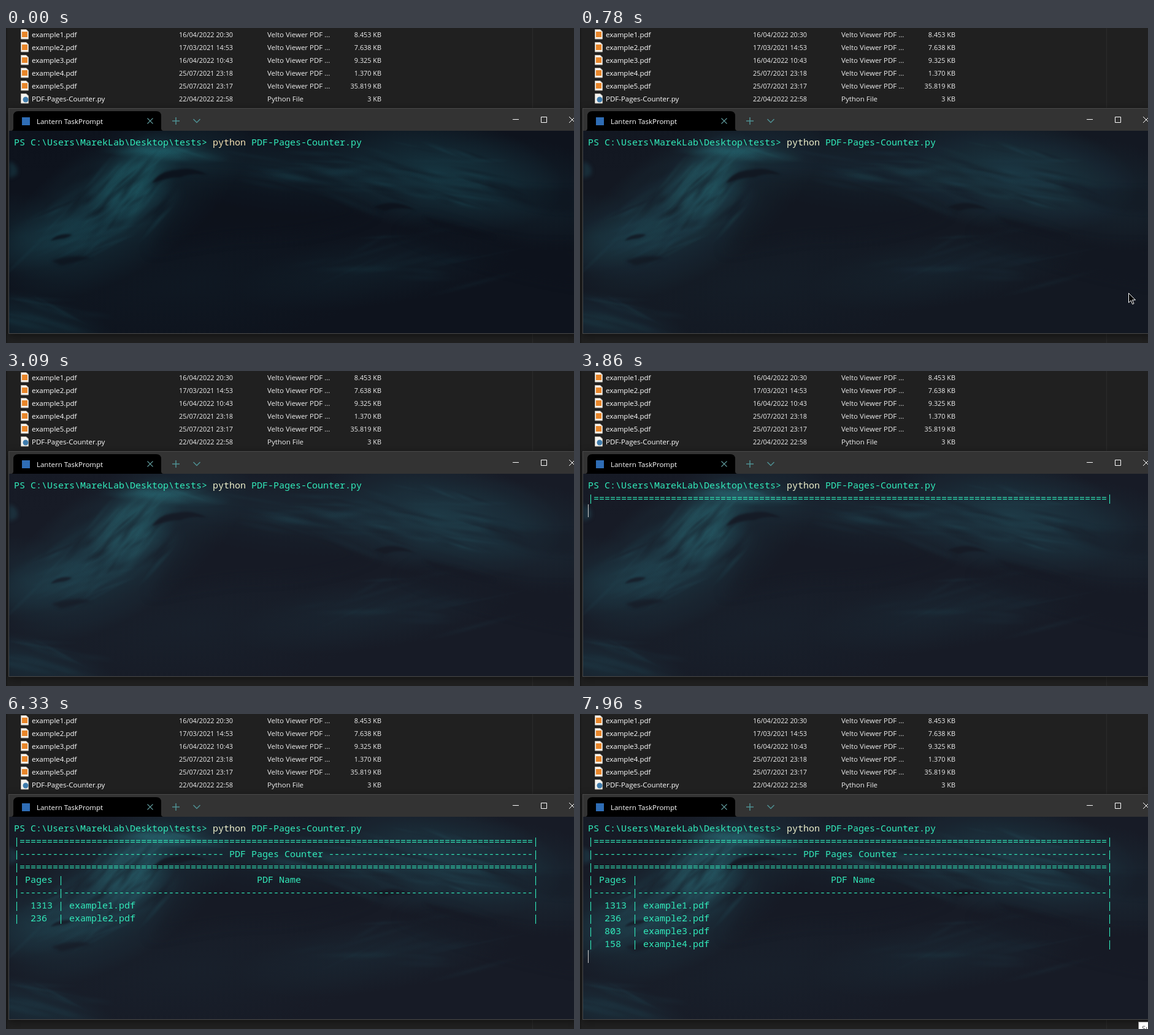
Recreate the animation shown at these times as an HTML page with a canvas. Size 926x515 px, loop 8 s.

```html
<!DOCTYPE html>
<html lang="en">
<head>
<meta charset="utf-8">
<title>PDF Pages Counter</title>
<style>
html, body { margin: 0; width: 100%; height: 100%; overflow: hidden; background: #202020; }
#stage { position: relative; width: 926px; height: 515px; overflow: hidden; background: #202020; font-family: "Open Sans", "Noto Sans", sans-serif; }
#stage > *, #term > * { position: absolute; }
.edge { left: 0; top: 0; width: 2px; height: 515px; background: #191919; }
.pane { left: 858px; top: 0; width: 1px; height: 515px; background: #2b2b2b; }
#files { left: 0; top: 0; }
#files text { fill: #fff; font-size: 11.5px; }
#files .num { font-size: 10.85px; fill: #f0f0f0; }
#files .kind { fill: #f0f0f0; }
#term { left: 4px; top: 131px; width: 930px; height: 369px; background: #333; box-shadow: 0 3px 12px rgba(0,0,0,.45); }
#art { left: 1px; top: 37px; }
#glow { left: 1px; top: 37px; width: 929px; height: 331px; background: rgba(110,110,130,.09); animation: focus 8s step-end infinite; }
#rim { inset: 0; border: 1px solid #4a4a4a; box-sizing: border-box; }
#chrome { left: 0; top: 131px; }
#lines { left: 13px; top: 176px; font: 500 15px/21px "Noto Sans Mono", "DejaVu Sans Mono", monospace; color: #32ebbb; white-space: pre; }
#lines div { height: 21px; }
#lines b { font-weight: 500; color: #eef0cb; animation: cmd 8s step-end infinite; }
#caret { left: 13px; top: 176px; width: 1px; height: 21px; background: #ccc; animation: caret 8s step-end infinite; }
#mouse { left: 0; top: 0; animation: mouse 8s step-end infinite; }
#tip { left: 910px; top: 503px; width: 30px; height: 24px; background: #fff; border: 1px solid #767676; box-sizing: border-box; font-size: 11.4px; line-height: 19px; padding-left: 5px; color: #575757; animation: tip 8s step-end infinite; }
.top { animation: top 8s step-end infinite; }
.head { animation: head 8s step-end infinite; }
.row1 { animation: row1 8s step-end infinite; }
.row2 { animation: row2 8s step-end infinite; }
.row3 { animation: row3 8s step-end infinite; }
.row4 { animation: row4 8s step-end infinite; }
@keyframes cmd { 0% { color: #f7e4b4; } .375%, 100% { color: #eef0cb; } }
@keyframes top { 0% { opacity: 0; } 48.25%, 100% { opacity: 1; } }
@keyframes head { 0% { opacity: 0; } 48.625%, 100% { opacity: 1; } }
@keyframes row1 { 0% { opacity: 0; } 62.125%, 100% { opacity: 1; } }
@keyframes row2 { 0% { opacity: 0; } 69.5%, 100% { opacity: 1; } }
@keyframes row3 { 0% { opacity: 0; } 88.5%, 100% { opacity: 1; } }
@keyframes row4 { 0% { opacity: 0; } 91%, 100% { opacity: 1; } }
@keyframes tip { 0% { opacity: 0; } 99%, 100% { opacity: 1; } }
@keyframes focus {
  0% { opacity: 0; } 8.25% { opacity: .2; } 8.8% { opacity: .4; }
  9.4% { opacity: .6; } 10% { opacity: .8; } 10.5%, 100% { opacity: 1; }
}
@keyframes caret {
  0% { opacity: 0; transform: translate(567px, 0); }
  15% { opacity: 1; transform: translate(567px, 0); }
  17.25% { opacity: 1; transform: translate(0, 21px); }
  25.25% { opacity: 0; transform: translate(0, 21px); }
  32% { opacity: 1; transform: translate(0, 21px); }
  38.625% { opacity: 0; transform: translate(0, 21px); }
  45.375% { opacity: 1; transform: translate(0, 21px); }
  48.25% { opacity: 1; transform: translate(0, 42px); }
  48.625% { opacity: 1; transform: translate(0, 126px); }
  52.125% { opacity: 0; transform: translate(0, 126px); }
  58.875% { opacity: 1; transform: translate(0, 126px); }
  62.125% { opacity: 1; transform: translate(0, 147px); }
  65.625% { opacity: 0; transform: translate(0, 147px); }
  72.375% { opacity: 1; transform: translate(0, 168px); }
  79.125% { opacity: 0; transform: translate(0, 168px); }
  85.875% { opacity: 1; transform: translate(0, 168px); }
  88.5% { opacity: 1; transform: translate(0, 189px); }
  91% { opacity: 1; transform: translate(0, 210px); }
  92.625% { opacity: 0; transform: translate(0, 210px); }
  99.5%, 100% { opacity: 1; transform: translate(0, 210px); }
}
@keyframes mouse {
  0% { transform: translate(890px, 530px); }
  2.625% { transform: translate(890px, 491px); }
  3% { transform: translate(890px, 465px); }
  3.375% { transform: translate(891px, 447px); }
  3.75% { transform: translate(893px, 437px); }
  4.125% { transform: translate(894px, 433px); }
  17.625% { transform: translate(894px, 530px); }
  83.875% { transform: translate(894px, 434px); }
  84.25% { transform: translate(895px, 439px); }
  84.625% { transform: translate(896px, 449px); }
  85% { transform: translate(897px, 463px); }
  85.5% { transform: translate(898px, 479px); }
  85.875% { transform: translate(899px, 494px); }
  86.25% { transform: translate(900px, 507px); }
  86.625%, 100% { transform: translate(900px, 530px); }
}
</style>
</head>
<body>
<div id="stage">
  <div class="edge"></div>
  <div class="pane"></div>
  <svg id="files" width="926" height="131"></svg>
  <div id="term">
    <canvas id="art" width="929" height="331"></canvas>
    <div id="glow"></div>
    <div id="rim"></div>
  </div>
  <svg id="chrome" width="926" height="38" fill="none">
    <path d="M8 37q4 0 4-4V13q0-8 8-8h225q8 0 8 8v20q0 4 4 4z" fill="#000"/>
    <rect x="26" y="15" width="13" height="13" fill="#2f6db5"/>
    <text x="50" y="26" font-size="11.5" fill="#fff">Lantern TaskPrompt</text>
    <path d="M230.500 16.500l9 9m0-9l-9 9" stroke="#5d9698" stroke-width="1.200"/>
    <path d="M271 21h12m-6-6v12M305.500 18l5.500 5.500 5.500-5.500" stroke="#4f9194" stroke-width="1.500"/>
    <path d="M826 18.500h10M872.500 14.500h9v9h-9zM918 14l10 10m0-10l-10 10" stroke="#fff"/>
  </svg>
  <div id="lines"></div>
  <div id="caret"></div>
  <div id="tip">Su</div>
  <svg id="mouse" width="13" height="21"><path d="M.5.5v15.500l3.700-3.500 2.500 6 2.300-1-2.500-5.800h5z" fill="#000" stroke="#fff"/></svg>
</div>
<script>
const $ = id => document.getElementById(id);

// File list
const files = [
  ["example1.pdf", "16/04/2022 20:30", "8.453 KB"],
  ["example2.pdf", "17/03/2021 14:53", "7.638 KB"],
  ["example3.pdf", "16/04/2022 10:43", "9.325 KB"],
  ["example4.pdf", "25/07/2021 23:18", "1.370 KB"],
  ["example5.pdf", "25/07/2021 23:17", "35.819 KB"],
  ["PDF-Pages-Counter.py", "22/04/2022 22:58", "3 KB"]
];
$("files").innerHTML = files.map(([name, date, size], i) => {
  const py = name.endsWith(".py");
  const mark = py ? '<circle cx="32" cy="12" r="4.500" fill="#3f7cac"/>'
                  : '<rect x="26" y="6" width="9" height="9" fill="#e8862a"/>';
  return `<g transform="translate(0 ${i * 21})">
    <path d="M24.500 2.500h8.500l3.500 3.500v12h-12z" fill="#f5f3ee" stroke="#b9b4ab"/>${mark}
    <text x="42" y="15">${name}</text><text class="num" x="282" y="15">${date}</text>
    <text class="kind" x="426" y="15">${py ? "Python File" : "Velto Viewer PDF ..."}</text>
    <text class="num" x="612" y="15" text-anchor="end">${size}</text></g>`;
}).join("");

// Terminal output
const bar = "|" + "=".repeat(93) + "|";
const dash = n => "-".repeat(n);
const row = (pages, name) => `|${("  " + pages).padEnd(7)}| ${name.padEnd(84)}|`;
const lines = [
  ["", "PS C:\\Users\\MarekLab\\Desktop\\tests&gt; <b>python</b> PDF-Pages-Counter.py"],
  ["top", bar],
  ["head", `|${dash(37)} PDF Pages Counter ${dash(37)}|`],
  ["head", bar],
  ["head", `| Pages |${" ".repeat(35)}PDF Name${" ".repeat(42)}|`],
  ["head", `|${dash(7)}|${dash(85)}|`],
  ["row1", row(1313, "example1.pdf")],
  ["row2", row(236, "example2.pdf")],
  ["row3", row(803, "example3.pdf")],
  ["row4", row(158, "example4.pdf")]
];
$("lines").innerHTML = lines.map(([cls, text]) => `<div class="${cls}">${text}</div>`).join("");

// Painted backdrop, in stage coordinates
const ctx = $("art").getContext("2d");
ctx.translate(-5, -168);
let seed = 7;
const rnd = () => (seed = (seed * 16807) % 2147483647) / 2147483647;
const spread = () => rnd() + rnd() - 1;

function blob(x, y, rx, ry, turn, rgb, a) {
  ctx.save();
  ctx.translate(x, y);
  ctx.rotate(turn);
  ctx.scale(rx, ry);
  const g = ctx.createRadialGradient(0, 0, 0, 0, 0, 1);
  g.addColorStop(0, `rgba(${rgb},${a})`);
  g.addColorStop(.5, `rgba(${rgb},${a * .5})`);
  g.addColorStop(1, `rgba(${rgb},0)`);
  ctx.fillStyle = g;
  ctx.fillRect(-1, -1, 2, 2);
  ctx.restore();
}
// Soft brush strokes scattered around a point
function brush(n, x, y, w, h, turn, len, rgb, a) {
  for (let i = 0; i < n; i++)
    blob(x + spread() * w, y + spread() * h, len * (.5 + rnd()), 3 + rnd() * 6, turn + spread() * .35, rgb, a * (.4 + rnd() * .6));
}
function shade(path, rgb, a, blur) {
  ctx.filter = `blur(${blur}px)`;
  ctx.fillStyle = `rgba(${rgb},${a})`;
  ctx.fill(new Path2D(path));
  ctx.filter = "none";
}
const teal = "32,98,108", mid = "25,66,78", dark = "13,18,28";
ctx.fillStyle = "#0e131d";
ctx.fillRect(0, 160, 940, 350);
blob(190, 285, 240, 110, -.6, mid, .65);
blob(210, 245, 95, 55, -.75, teal, .6);
blob(120, 325, 170, 50, -.35, mid, .55);
blob(30, 340, 110, 70, .2, mid, .3);
blob(260, 203, 110, 18, .08, teal, .45);
blob(450, 235, 240, 70, .1, mid, .28);
blob(700, 240, 210, 95, .12, mid, .72);
blob(850, 270, 170, 90, .2, mid, .28);
blob(600, 395, 230, 60, -.15, mid, .2);
blob(300, 420, 330, 110, -.1, mid, .1);
blob(30, 480, 150, 50, .2, mid, .4);
blob(75, 185, 140, 50, -.1, dark, .75);
brush(40, 195, 260, 75, 55, -.85, 42, teal, .22);
brush(36, 110, 330, 110, 45, -.5, 50, mid, .3);
brush(16, 255, 203, 65, 10, .1, 45, teal, .25);
brush(30, 690, 245, 140, 60, .15, 50, mid, .3);
brush(22, 470, 230, 170, 45, .1, 60, mid, .22);
brush(36, 165, 285, 120, 75, -.7, 36, dark, .42);
brush(26, 690, 235, 180, 65, .2, 50, dark, .34);
brush(18, 660, 380, 220, 60, -.2, 70, mid, .14);
brush(14, 60, 470, 90, 30, .25, 60, mid, .2);
shade("M238 254Q252 238 290 238Q330 240 400 245Q500 250 600 300Q520 340 380 340Q300 350 235 365Q260 320 285 270Q270 246 238 254Z", dark, .42, 10);
shade("M238 254Q250 234 278 232Q305 226 328 240Q300 237 285 244Q265 243 238 254Z", dark, .9, 1.5);
shade("M600 293Q632 277 668 298Q640 291 618 299Z", dark, .85, 1.5);
shade("M680 309Q730 318 790 343Q860 360 930 355V420Q760 390 640 335Z", dark, .4, 8);
shade("M680 309Q740 322 798 343Q750 338 700 323Z", dark, .7, 2);
shade("M782 250Q805 246 830 258Q870 265 926 262V300Q830 300 782 255Z", dark, .4, 4);
shade("M72 348Q85 334 108 338Q100 344 88 345Z", dark, .8, 1.5);
shade("M74 381Q105 368 140 376Q110 384 90 388Z", dark, .7, 2);
shade("M5 218Q22 224 18 240L5 246Z", mid, .5, 3);
</script>
</body>
</html>
```
